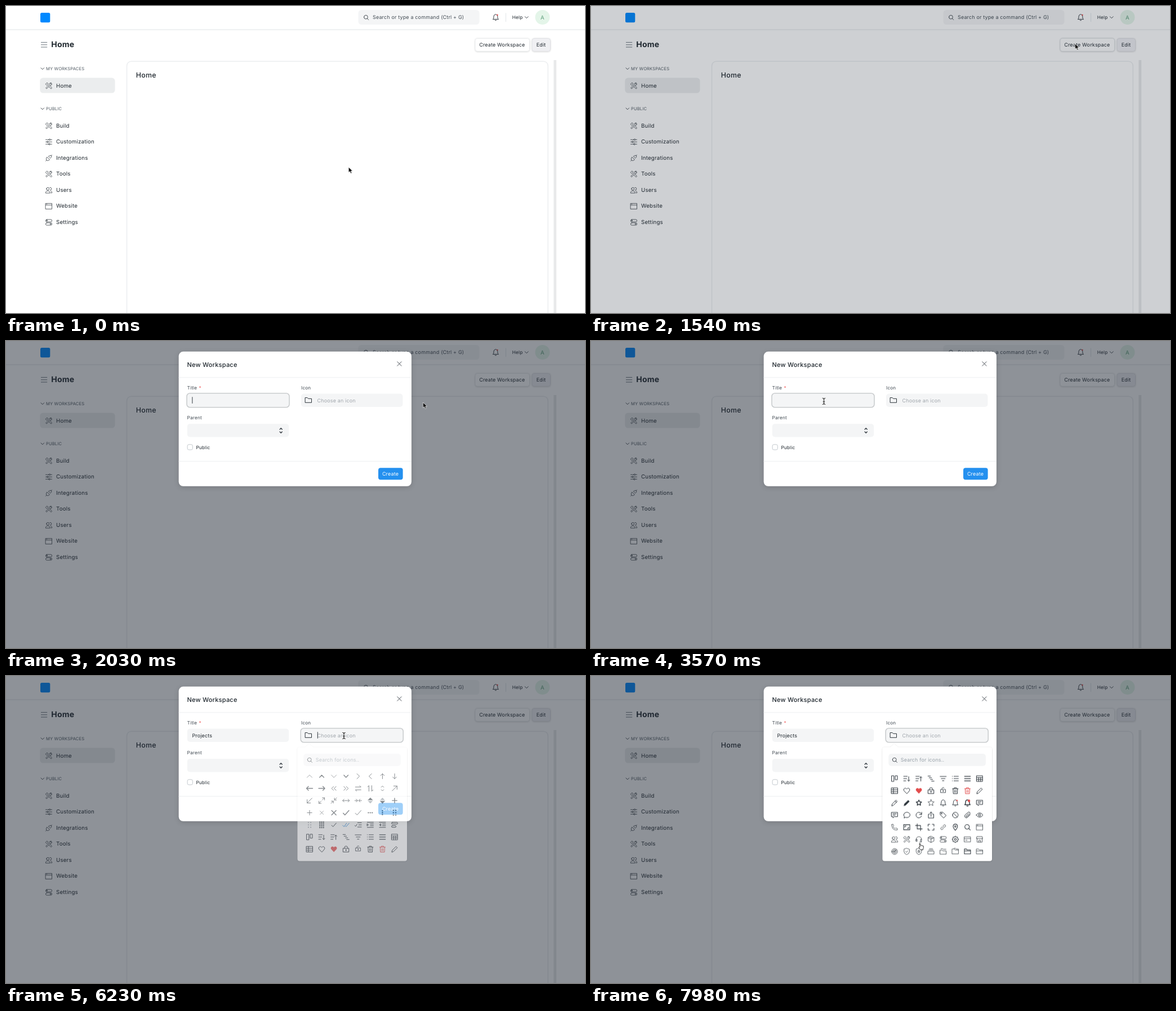
An HTML page that plays this animation: 1028x545 px, repeating every 8 s.

```html
<!DOCTYPE html>
<html lang="en">
<head>
<meta charset="utf-8">
<title>New Workspace</title>
<style>
  html, body { margin: 0; width: 100%; height: 100%; overflow: hidden; background: #fff; }
  svg { display: block; width: 1028px; height: 545px; }
  text { font: 400 8.95px Inter, "Open Sans", sans-serif; letter-spacing: .02em; fill: #1f272e;
         text-rendering: geometricPrecision; white-space: pre; }
  text.s { font-size: 8.26px; }
  text.m { font-size: 9.7px; }
  text.cap { font-size: 7.57px; fill: #505a62; }
  text.h { font-size: 12.4px; font-weight: 500; }
  .lab { fill: #434c54 !important; }
  .hint { fill: #a0a6ac !important; }
  .field { fill: #f4f5f6; }
  .line { stroke: #edeff1; }
  .ring { fill: none; stroke: #c9ccce; stroke-width: 1.6; }

  .i path { fill: none; stroke: #2b333a; stroke-linecap: round; stroke-linejoin: round; }
  .i .t, .thin path { stroke-width: .75; }
  .i .b { stroke-width: 1.4; }
  .thin .b { stroke-width: 1.05; }
  .i .f { fill: #2b333a; stroke-width: .4; }
  .i .g { fill: #8d959c; stroke: none; }
  .i .r { stroke: #e24c4c; }
  .i .rf { fill: #e24c4c; stroke: none; }
  .i .u { stroke: #318ad8; }

  /* the script's clock sets --t; paused animations are scrubbed by it */
  .k { animation: 8s linear infinite paused; animation-delay: calc(var(--t, 0) * -1ms); }
  #dim { animation-name: dim; }
  #press { animation-name: press; opacity: 0; }
  #modal { animation-name: show, slide; }
  #pop { animation-name: pop; }
  #titleRing { animation-name: titleRing; }
  #iconRing { animation-name: iconRing; }
  #rows { animation-name: scroll; }
  #cursor { animation-name: move; }
  #arrow { animation-name: arrow; }
  #beam { animation-name: beam; }
  #hand { animation-name: hand; }
  #titleRing, #iconRing, #press, #arrow, #beam, #hand { animation-timing-function: step-end; }

  @keyframes dim { 0%, 18.44% { opacity: 0 } 20.31%, 100% { opacity: 1 } }
  @keyframes press { 0% { opacity: 0 } 18.3% { opacity: 1 } 24.4%, 100% { opacity: 0 } }
  @keyframes show { 0%, 20.5% { opacity: 0 } 22.4%, 100% { opacity: 1 } }
  @keyframes slide {
    0% { transform: translateY(-34.4px) }
    20.69% { transform: translateY(-34.4px); animation-timing-function: ease-out }
    24.44%, 100% { transform: translateY(0) }
  }
  @keyframes titleRing { 0% { opacity: 0 } 25.25% { opacity: 1 } 76%, 100% { opacity: 0 } }
  @keyframes iconRing { 0% { opacity: 0 } 76%, 100% { opacity: 1 } }
  @keyframes pop { 0%, 76.81% { opacity: 0 } 78.69%, 100% { opacity: 1 } }
  @keyframes scroll {
    0% { transform: translateY(0) }
    84% { transform: translateY(0); animation-timing-function: cubic-bezier(.3, .2, .5, 1) }
    94.5% { transform: translateY(-72px) }
    96.25% { transform: translateY(-72px); animation-timing-function: cubic-bezier(.4, .1, .7, .8) }
    99.75%, 100% { transform: translateY(-103.7px) }
  }
  @keyframes move {
    0% { transform: translate(608.3px, 286px) }
    1.75% { transform: translate(608.3px, 286px); animation-timing-function: ease-in-out }
    11.375% { transform: translate(859.5px, 67px) }
    22.75% { transform: translate(859.5px, 67px); animation-timing-function: ease-in }
    25.375% { transform: translate(740.5px, 109px) }
    28% { transform: translate(479px, 110px); animation-timing-function: ease-out }
    32.375%, 65.625% { transform: translate(413.5px, 107px) }
    67.375% { transform: translate(445px, 127px) }
    70% { transform: translate(572px, 129px) }
    70.875% { transform: translate(612px, 112px); animation-timing-function: ease-out }
    72.625% { transform: translate(600px, 106px) }
    78.75% { transform: translate(600px, 106px); animation-timing-function: ease-in-out }
    82.25%, 100% { transform: translate(584px, 297px) }
  }
  @keyframes arrow {
    0% { opacity: 1 } 26.125% { opacity: 0 } 67.25% { opacity: 1 } 70.75% { opacity: 0 }
    79.5% { opacity: 1 } 81.25%, 100% { opacity: 0 }
  }
  @keyframes beam {
    0% { opacity: 0 } 26.125% { opacity: 1 } 45.375% { opacity: 0 } 65.5% { opacity: 1 }
    67.25% { opacity: 0 } 70.75% { opacity: 1 } 79.5%, 100% { opacity: 0 }
  }
  @keyframes hand { 0% { opacity: 0 } 81.25%, 100% { opacity: 1 } }
</style>
</head>
<body>
<svg viewBox="0 0 1028 545">
  <defs>
    <filter id="soft" x="-20%" y="-20%" width="140%" height="150%">
      <feDropShadow dx="0" dy="2" stdDeviation="4" flood-color="#000" flood-opacity=".16"/>
    </filter>
    <filter id="low" x="-10%" y="-20%" width="120%" height="150%">
      <feDropShadow dx="0" dy=".6" stdDeviation=".8" flood-color="#000" flood-opacity=".2"/>
    </filter>
    <clipPath id="list"><rect x="526" y="167" width="176" height="152"/></clipPath>
  </defs>

  <rect width="1028" height="545" fill="#fff"/>
  <g id="page">
    <rect y="41" width="1028" height="1.6" fill="#ebedef"/>
    <rect y="42.6" width="1028" height="1" fill="#f7f8f8"/>
    <rect x="61" y="12" width="17.3" height="17.3" rx="2.5" fill="#0089ff"/>
    <rect class="field" x="625.5" y="7" width="215" height="26" rx="5.5"/>
    <text x="651" y="23.3" class="lab">Search or type a command (Ctrl + G)</text>
    <path d="M887.5 12.5v15.5" stroke="#e2e6e9"/>
    <text x="898.8" y="23.2" class="s">Help</text>
    <circle cx="952.5" cy="20" r="13" fill="#e4f5e9"/>
    <text x="952.5" y="23.5" class="m" text-anchor="middle" style="fill:#5f9f7c">A</text>

    <path d="M62 64.6h11.2M62 68.8h11.2M62 73h11.2" stroke="#6b757d"/>
    <text x="80.2" y="73.2" style="font-size:14px;font-weight:700">Home</text>
    <rect x="833" y="57.5" width="96.5" height="22.8" rx="4" fill="#fff" stroke="#e3e5e7" stroke-width=".7" filter="url(#low)"/>
    <rect id="press" class="k" x="832.6" y="57" width="97.3" height="23.6" rx="4.5" fill="none" stroke="#dfe2e4"/>
    <text x="840.2" y="72.2">Create Workspace</text>
    <rect x="934" y="57.5" width="32.5" height="22.8" rx="4" fill="#f0f0f3" stroke="#dcdee1" stroke-width=".8" filter="url(#low)"/>
    <text x="941.8" y="72.2">Edit</text>

    <text x="71" y="113.7" class="cap">MY WORKSPACES</text>
    <rect x="60.3" y="127.6" width="133.2" height="27" rx="5.5" fill="#ebedee"/>
    <text x="71" y="184.9" class="cap">PUBLIC</text>

    <rect x="214.5" y="98.2" width="747.8" height="470" rx="8" fill="#fff" stroke="#eceef0" stroke-width="1.6"/>
    <text x="230.8" y="127.2" class="h">Home</text>
    <rect x="972.4" y="96" width="4.8" height="449" fill="#e8e9ea"/>
    <g id="pageIcons" class="i"></g>
  </g>

  <rect id="dim" class="k" width="1028" height="545" fill="#1f2733" fill-opacity=".5"/>

  <g id="modal" class="k">
    <rect x="306.7" y="18.8" width="413.2" height="239" rx="8" fill="#fff" filter="url(#soft)"/>
    <path class="line" d="M306.7 64.8h413.2M306.7 213.5h413.2"/>
    <text x="321.5" y="45.6" style="font-size:11.01px;font-weight:500">New Workspace</text>
    <text x="321.6" y="86.1" class="s lab">Title</text>
    <text x="342.4" y="86.4" class="s" style="fill:#f0605f">*</text>
    <text x="524" y="86.1" class="s lab">Icon</text>
    <text x="321.6" y="139.1" class="s lab">Parent</text>
    <rect class="field" x="321.8" y="93.6" width="180.4" height="23.4" rx="5"/>
    <rect class="field" x="524" y="93.6" width="180.4" height="23.4" rx="5"/>
    <rect class="field" x="321.8" y="147" width="180.4" height="23.4" rx="5"/>
    <rect id="titleRing" class="ring k" x="321" y="92.8" width="182" height="25" rx="5.5"/>
    <rect id="iconRing" class="ring k" x="523.2" y="92.8" width="182" height="25" rx="5.5"/>
    <text id="typed" x="330.4" y="108.5"></text>
    <text x="552.5" y="108.5" class="hint">Choose an icon</text>
    <rect x="322.1" y="183.8" width="9.3" height="9.3" rx="2.6" fill="#fff" stroke="#bcc2c8" stroke-width=".9"/>
    <text x="337.4" y="191.5" class="s">Public</text>
    <rect x="661" y="225.3" width="43.6" height="20.9" rx="4" fill="#2490ef"/>
    <text x="667.9" y="239" style="fill:#fff">Create</text>
    <g id="modalIcons" class="i"></g>
    <rect id="caret" y="99.3" width=".9" height="11.6" fill="#1f272e"/>
  </g>

  <g id="pop" class="k">
    <path d="M521.5 126.5h10l6.8-5.8 6.8 5.8H708a4 4 0 0 1 4 4v194a4 4 0 0 1-4 4H521.5a4 4 0 0 1-4-4v-194a4 4 0 0 1 4-4z" fill="#fff" filter="url(#low)"/>
    <rect class="field" x="528.3" y="138" width="172.6" height="21.7" rx="5"/>
    <text x="549.8" y="152" style="fill:#98a1a9">Search for icons..</text>
    <g id="popIcons" class="i"></g>
    <g clip-path="url(#list)"><g id="rows" class="k i"></g></g>
  </g>

  <g id="cursor" class="k">
    <path id="arrow" class="k" d="M0 0v9.6l2.2-2 1.6 3.7 1.8-.8L4 7h3z" fill="#000" stroke="#fff" stroke-width=".7"/>
    <g id="beam" class="k" fill="none" stroke-linecap="round">
      <path d="M-2.2-5.6Q0-5.6 0-4v8Q0 5.6-2.2 5.6M2.2-5.6Q0-5.6 0-4M0 4Q0 5.6 2.2 5.6M-1.2.8h2.4" stroke="#fff" stroke-width="2"/>
      <path d="M-2.2-5.6Q0-5.6 0-4v8Q0 5.6-2.2 5.6M2.2-5.6Q0-5.6 0-4M0 4Q0 5.6 2.2 5.6M-1.2.8h2.4" stroke="#000"/>
    </g>
    <path id="hand" class="k" d="M-1 1Q-.8-.4.4.4L1.6 4.2 2.6 3.6 3.4 4.4 4.4 3.8 5 4.8 6 4.6Q7 7.5 5.6 9.6L5.4 11.6H1.2L-2 7.6Q-2.4 6 .2 6.6z" fill="#fff" stroke="#000" stroke-width=".8" stroke-linejoin="round"/>
  </g>
</svg>

<script>
const $ = id => document.getElementById(id);

// Icon parts, drawn about 0,0 in a 12 px box
const p = (d, cls = '', rot = 0) => `<path d="${d}" class="${cls}" transform="rotate(${rot})"/>`;
const ring = (x, y, r) => `M${x - r} ${y}a${r} ${r} 0 1 1 ${2 * r} 0a${r} ${r} 0 1 1 ${-2 * r} 0z`;
const box = (x, y, w, h) => `M${x} ${y}h${w}v${h}h${-w}z`;
const star = (n, a, b) => 'M' + Array.from({ length: 2 * n }, (_, i) => {
  const r = i % 2 ? b : a, q = Math.PI * i / n;
  return `${(r * Math.sin(q)).toFixed(2)} ${(-r * Math.cos(q)).toFixed(2)}`;
}).join('L') + 'z';
const dots = (cols, rows, gap, cls) => p(Array.from({ length: cols * rows }, (_, i) =>
  ring((i % cols - (cols - 1) / 2) * gap, ((i / cols | 0) - (rows - 1) / 2) * gap, .9)).join(''), cls);
const at = (icon, x, y, s = 1) => `<g transform="translate(${x} ${y}) scale(${s})">${icon}</g>`;

const chev = 'M-4.5 2.2L0-2.3 4.5 2.2', chev2 = 'M-3.8 1.9L0-1.9 3.8 1.9';
const up = 'M0 4.5V-4.5M-3.3-1.2L0-4.5 3.3-1.2', long = 'M0 5.5V-5.5M-3.5-2L0-5.5 3.5-2';
const dbl = 'M-.5-3.5L-4 0l3.5 3.5M4-3.5L.5 0 4 3.5';
const swap = 'M-5-2.5H5L2.7-4.8M5 2.5H-5L-2.7 4.8';
const sel = 'M-2.2-2.2L0-4.4 2.2-2.2M-2.2 2.2L0 4.4 2.2 2.2';
const diag = 'M-4.3 4.3l8.6-8.6H-1.7M4.3-4.3V1.7';
const plus = 'M-4.2 0h8.4M0-4.2v8.4', cross = 'M-4-4l8 8M4-4l-8 8';
const check = 'M-5 .8L-2 4 5.2-4', tri = 'M-4.2-.8L0-5.2 4.2-.8z';
const dent = 'M-5.5-4.5h11M0-1.5h5.5M0 1.5h5.5M-5.5 4.5h11';
const sort = 'M-5.5-4H1M-5.5 0H0M-5.5 4h4M3.5-3.5v8';
const heart = 'M0 5L-4.7.2C-7.2-3-2.5-6.7 0-3 2.5-6.7 7.2-3 4.7.2z';
const trash = 'M-5-3.6H5M-2-3.6v-1.7h4v1.7M-4-3.6l.4 8.8h7.2l.4-8.8M-1.2-1v4M1.2-1v4';
const pencil = 'M-5 5l.8-3.2L2.6-4.8 4.8-2.6-2 4.2z';
const bell = 'M-4.8 3.2c1.6-1 1.2-3 1.4-4.6C-3.1-6.6 3.1-6.6 3.4-1.4 3.6.2 3.2 2.2 4.8 3.2zM-1.2 5.2q1.2.9 2.4 0';
const note = 'M-5.3-4.7H5.3v7.5H-.8l-2 2.2v-2.2h-2.5zM-3-2.2H3M-3 .3H1';
const lens = ring(-.7, -.7, 4) + 'M2.3 2.3L5 5';
const pane = box(-5.5, -5, 11, 10) + 'M-5.5-2.2h11M-4-3.6h.8';
const people = ring(-1.8, -2.3, 2.4) + 'M-5.7 4.8c0-5 7.8-5 7.8 0zM1.8-4.6a2.3 2.3 0 1 1 .6 4.5M3.2 1.4c2 .4 2.5 1.6 2.5 3.4H3.4';
const tools = 'M-5.5-3.2l2.5-2.3 2.2 2.2-2.5 2.3zM-.3-1.2L1-.2M2.2-.2L5.5 4 4 5.5.4 1.8M-.8-.6L-5.3 3.9-3.9 5.3.3 1.2M1.2-2.2Q.8-5.6 4.3-5.4L3.2-3.6 5.5-3.6Q5.4-.6 2.4-.6';
const pill = 'h7a2.1 2.1 0 0 1 0 4.2h-7a2.1 2.1 0 0 1 0-4.2z';
const toggles = 'M-3.5-5' + pill + 'M-3.5.9' + pill + ring(-3.2, -2.9, .8) + ring(3.2, 3, .8);
const sliders = 'M-5.5-4H0M3-4h2.5M-5.5 0h2M-.5 0h6M-5.5 4h5M2.5 4h3' + ring(1.5, -4, 1.3) + ring(-2, 0, 1.3) + ring(1, 4, 1.3);
const plug = 'M5.5-5.5l-1.7 1.7M-5.5 5.5l1.7-1.7M-3-1.5L1.5 3-.5 4.4q-2 1-3.4-.4t-.5-3.4zM-.4-2.6L2.6.4 4.2-1q1.4-1.5 0-3t-3 0z';
const folder = 'M-5.5-4.4h3.6l1.5 1.7h5.9v7h-11z';
const shield = 'M0-5.6L4.8-4v4.4Q4.4 4 0 5.6-4.4 4-4.8.4V-4z';
const bag = box(-5, -1.5, 10, 6.5) + 'M0 .7v2M-1 1.7h2';

const grid = [
  [p(chev, 't'), p(chev2, 'b'), p(chev, 't', 180), p(chev2, 'b', 180), p(chev, '', 90), p(chev, '', -90), p(up), p(up, '', 180)],
  [p(long, 'b', -90), p(long, 'b', 90), p(dbl), p(dbl, '', 180), p(swap), p(swap, '', 90), p(sel), p(diag)],
  [p(diag, '', 180), p('M-1 1l-4 4h4M-5 5V1M1-1l4-4H1M5-5v4'), p('M-5 5l4-4h-3.5M-1 1v3.5M5-5L1-1h3.5M1-1v-3.5'),
    p('M-6 0H6M-3.5-2.5L-6 0l2.5 2.5M3.5-2.5L6 0 3.5 2.5'), p('M-6 0h5M-3.5-2.5L-1 0l-2.5 2.5M6 0H1M3.5-2.5L1 0l2.5 2.5'),
    p(tri, 'f') + p(tri, 'g', 180), p(tri, 'g') + p(tri, 'f', 180), p(plus, 'b')],
  [p(plus), p('M-3-3l6 6M3-3l-6 6', 't'), p(cross, 'b'), p(check, 'b'), p(check), dots(3, 1, 3.4, 'f'), dots(1, 3, 3.4, 'f'), dots(2, 3, 4.2, 'f')],
  [dots(2, 3, 4.2, 'g'), dots(3, 4, 3.2, 'f'), p('M-4 .8L-1.5 3.3 4.2-3.2'), p('M-6 .8L-3.5 3.3 1-3M-1 2.3l1 1 5.5-6.2', 'u'),
    p('M-6 1.2l1.5 1.5L-2-1M-1-3.8h6.8M1 0h4.8M-1 3.8h6.8'), p(dent + 'M-5.5-1.7L-3.2 0l-2.3 1.7z'), p(dent + 'M-3.2-1.7L-5.5 0l2.3 1.7z'),
    p('M-4-4.4h8a1 1 0 0 1 0 3h-8a1 1 0 0 1 0-3zM-4 1.4h5a1 1 0 0 1 0 3h-5a1 1 0 0 1 0-3z')],
  [p(box(-5, -5, 3.8, 10) + box(1.4, -5, 3.6, 7)), p(sort + 'M1.5 2.5l2 2 2-2'), p(sort + 'M1.5-1.5l2-2 2 2'), p('M-5.5-4.5h4.5M-3.5-1.5h4.5M-1 1.5h4M1 4.5h4.5'),
    p('M-5.5-3.8h11M-3.5 0h7M-1.5 3.8h3'), p('M-2.5-4h8M-2.5 0h8M-2.5 4h8M-5.4-4h.3M-5.4 0h.3M-5.4 4h.3'), p('M-5.2-4h10.4M-5.2 0h10.4M-5.2 4h10.4', 'b'),
    p(box(-5.2, -5, 10.4, 10) + 'M-5.2-1.8H5.2M-5.2 1.6H5.2M-1.8-1.8V5M1.8-1.8V5')],
  [p(box(-5.5, -5, 11, 10) + 'M-5.5-1.7h11M-5.5 1.7h11M-2-5V5'), p(heart), p(heart, 'rf'), p(bag + 'M-2.8-1.5v-1.2a2.8 2.8 0 0 1 5.6 0v1.2'),
    at(p(bag + 'M-2.5-1.5v-1.7a2.5 2.5 0 0 1 4.5-1.4'), 0, -1, .85), p(trash), p(trash, 'r'), p(pencil)],
  [p(pencil + 'M1-3.2L3.2-1'), p(pencil, 'f'), p(star(5, 5, 2.5), 'b'), p(star(5, 5.9, 2.7), 't'), p(bell),
    p(bell) + p(ring(3, -4.2, 1.3), 'rf'), p(bell, 'b') + p(ring(2.6, -3.8, 2.3), 'rf'), p(note)],
  [p(note), p('M-4.6 5l.5-2.2A5.6 4.8 0 1 1-2 4.2z'), p('M4.8-1A5 5 0 1 0 4.6 1.8M5-5v4H1'), p('M-2.5-1.5h-2.2v6.8h9.4v-6.8H2.5M0 2.5v-8M-2.3-3.2L0-5.5l2.3 2.3'),
    p('M-5-5h4.5L5.3.8.8 5.3-5-.5z' + ring(-2.6, -2.6, .8)), p(ring(0, 0, 5) + 'M-3.5-3.5l7 7'),
    p('M4.9-.8L.2 4a3 3 0 0 1-4.3-4.3L1-4.7A2 2 0 0 1 4-1.8L-.8 3a1 1 0 0 1-1.5-1.5L2-2.6'), p('M-6 0Q0-7.8 6 0 0 7.8-6 0z' + ring(0, 0, 1.8))],
  [p('M-5-4.6l2.2-.8 1.5 3-1.4 1.3q1 2.4 3.6 3.6L2.2 1.2l3 1.6L4.6 5Q-5 6-5-4.6z'), p(box(-5.5, -4.5, 11, 9) + 'M-3.3.2v-2.4h2.4M3.3-.2v2.4H.9', 'b'),
    p('M-3-6v9h9M-6-3h9v9', 'b'), p('M-5.2-2v-3.2H-2M2-5.2h3.2V-2M5.2 2v3.2H2M-2 5.2h-3.2V2', 'b'),
    p('M-1 1.9h-2.4a1.9 1.9 0 0 1 0-3.8h2.4M1-1.9h2.4a1.9 1.9 0 0 1 0 3.8H1M-2 0h4', '', -45), p('M0 5.5C-7-2-3-5.5 0-5.5S7-2 0 5.5z' + ring(0, -1.3, 1.3), 'b'), p(lens, 'b'), p(pane)],
  [p(people), p(tools), p('M-4.8 2.5V0a4.8 4.8 0 0 1 9.6 0v2.5M-4.8 0H-3v3.5h-1.8zM4.8 0H3v3.5h1.8v1L1 5.2'),
    p('M0-5.5L5.2-3v6L0 5.5-5.2 3v-6zM-5.2-3L0-.5 5.2-3M0-.5v6M-2.6-4.2L2.6-1.8'), p(toggles), p(star(8, 5.6, 4.4) + ring(0, 0, 1.8), 'b'),
    p(box(-5.5, -4.5, 11, 9) + 'M-5.5-1.5h11M-3.5 1.5h3'), p('M-4.5-5h9l1 3.5h-11zM-4.5-1.5V5h9v-6.5M-1.5 5V1.5h3V5')],
  [p([5.2, 3.2, 1.2].map(r => ring(0, 0, r)).join('') + 'M0 0l3.5-3.5'), p(shield + 'M-2 0l1.5 1.5L2-1.2'), p(shield + star(5, 2.4, 1.1)), p('M-2.8-5h5.6M-4-2.8h8M-5.3-.5H5.3v5H-5.3z'),
    p('M-4-5h3l1 1h5M-5.3-2.4h3.6l1 1.3h6v5.9H-5.3z'), p(folder + 'M-2.5-5.6h3l1 1.2h4v2'), p(folder + 'M-5.5-1h11', 'b'), p(folder + 'M-5.5-1h11')]
];

const step = 21.57;
$('rows').innerHTML = grid.map((row, r) => `<g class="${r > 8 ? 'thin' : ''}">` +
  row.map((icon, c) => at(icon, 539 + c * step, 178 + r * step)).join('') + '</g>').join('');

const menu = [['Build', tools], ['Customization', sliders], ['Integrations', plug], ['Tools', tools],
  ['Users', people], ['Website', pane], ['Settings', toggles]];
const item = ([name, icon], y) => at(p(icon, 't'), 76, y + .4) + `<text class="m" x="89" y="${y + 3.4}">${name}</text>`;
$('pageIcons').innerHTML = item(['Home', tools], 141.2) +
  menu.map((m, i) => item(m, 212.3 + i * 28.55)).join('') +
  at(p(chev, 'b', 180), 64.8, 111.2, .62) + at(p(chev, 'b', 180), 64.8, 182.4, .62) +
  at(p(chev, 'b', 180), 924.3, 20.2, .64) + at(p(lens), 639.5, 20.3, .85) +
  at(p(bell) + p(ring(3, -4.2, 1.3), 'rf'), 869.4, 20.2);
$('modalIcons').innerHTML = at(p(cross), 698.4, 40.4, .92) + at(p(folder), 537, 105) + at(p(sel, 'b'), 488.2, 159, .95);
$('popIcons').innerHTML = at(p(lens), 539.3, 149.2, .85);

// Typing and the blinking caret
const word = 'Projects', keys = [3640, 3920, 4060, 4340, 4480, 4690, 4900, 5040];
const blinks = [[2030, 2590], [3080, 3570], [3640, 5600], [6090, 6580], [7140, 7630]];
const typed = $('typed'), caret = $('caret'), start = performance.now();

function draw() {
  const t = Math.floor((performance.now() - start) % 8000 / 70) * 70;
  document.documentElement.style.setProperty('--t', t);
  typed.textContent = word.slice(0, keys.filter(k => t >= k).length);
  const x = t >= 6090 ? 552.8 : 330.4 + (typed.textContent ? typed.getComputedTextLength() : 0);
  caret.setAttribute('x', x);
  caret.setAttribute('opacity', blinks.some(([on, off]) => t >= on && t < off) ? 1 : 0);
  requestAnimationFrame(draw);
}
draw();
</script>
</body>
</html>
```
